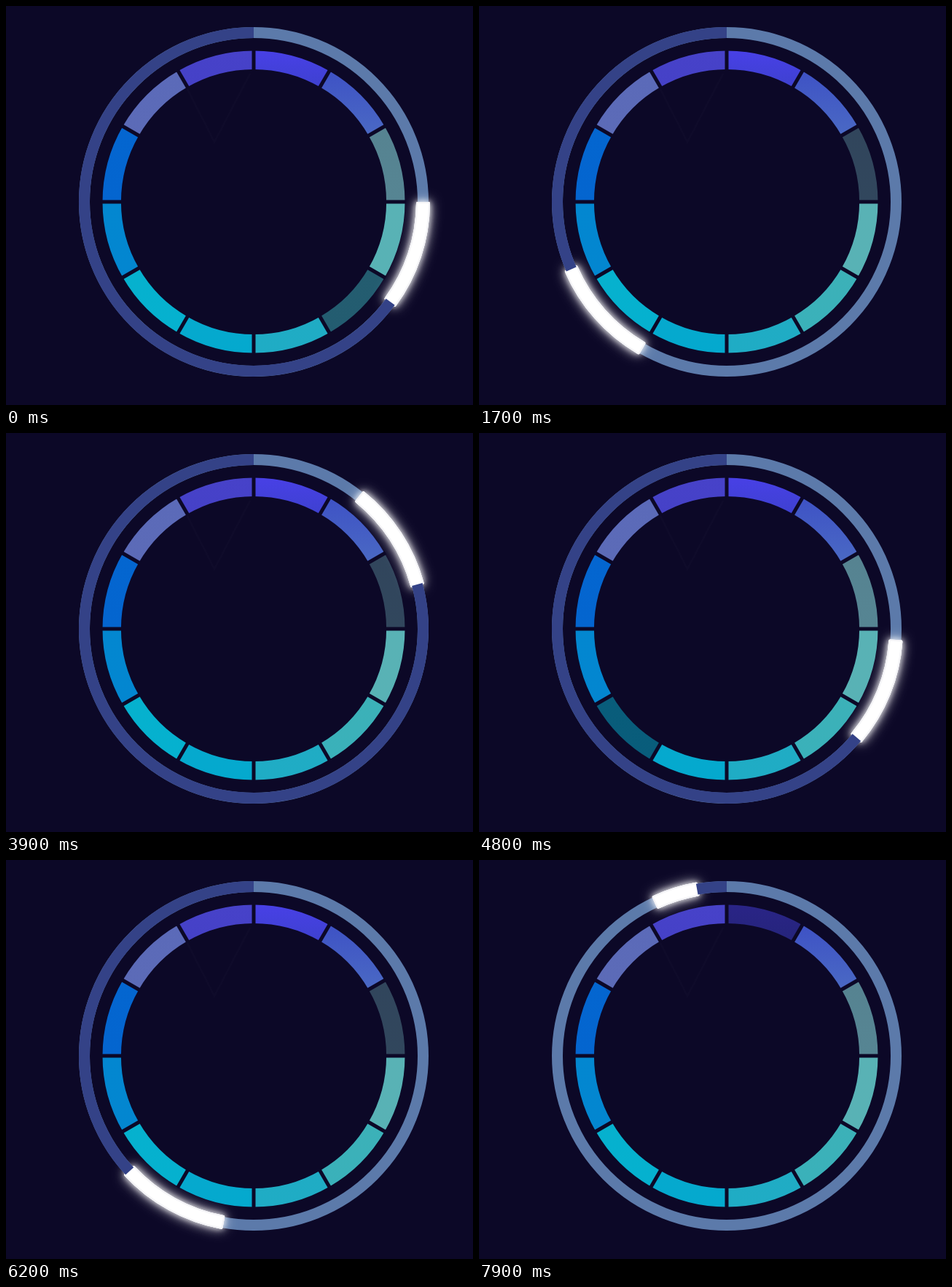
Recreate the animation shown at these times as an HTML page with a canvas. Size 641 px wide and 548 px high, loop 8 s.

```html
<!DOCTYPE html>
<html lang="en">
<head>
<meta charset="utf-8">
<title>Ring loader</title>
<style>
  html, body { margin: 0; width: 100%; height: 100%; overflow: hidden; background: #0c0827; }
  canvas { display: block; }
</style>
</head>
<body>
<canvas id="stage" width="641" height="548"></canvas>
<script>
const ctx = document.getElementById('stage').getContext('2d');
const BG = '#0c0827', CX = 340, CY = 269;
const LOOP = 8000, TICK = 100;
const TRACK = { r: 232.5, width: 15, dark: '#344287', light: '#5c7aaa' };
const DIAL = { r: 194.8, width: 25.4 };

// One lap of the bar: time in ms, tail angle, head angle (clockwise from the top)
const LAP = 4770, LAP_START = 3290;
const STEPS = [
  [0, 0, 0],
  [160, 10.2, 25],
  [450, 28.7, 63],
  [610, 38.9, 74.8],
  [1480, 90.5, 126.2],
  [1510, 94.2, 129.9],
  [2280, 148.5, 185.2],
  [2910, 190.7, 227.1],
  [4080, 275.7, 311.3],
  [4300, 291.5, 327.3],
  [4610, 335.3, 349.9],
  [4770, 360, 360]
];

// Segment colours, top and bottom, clockwise from the top
const COLORS = [
  ['#4840e6', '#3e41d0'], ['#3e52c5', '#4a69c4'], ['#568391', '#568593'],
  ['#59b2b5', '#58b2b5'], ['#3cb1b8', '#3ab1ba'], ['#20acc4', '#1facc5'],
  ['#06a9ce', '#04a9ce'], ['#06b1ce', '#05b1cf'], ['#0387d0', '#0386d0'],
  ['#0466d0', '#0465cf'], ['#5b6ab9', '#5c6bb7'], ['#4742c9', '#4541c7']
];
const BLINK = 182, BLINK_OFFSET = 4.8;

const rad = deg => (deg - 90) * Math.PI / 180;

function barAt(t) {
  const u = (t - LAP_START + LAP) % LAP;
  const i = STEPS.findIndex(s => s[0] > u);
  const a = STEPS[i - 1], b = STEPS[i];
  const k = (u - a[0]) / (b[0] - a[0]);
  return [1, 2].map(n => a[n] + (b[n] - a[n]) * k);
}

function arc(r, width, from, to, color) {
  ctx.beginPath();
  ctx.arc(CX, CY, r, rad(from), rad(to));
  ctx.lineWidth = width;
  ctx.strokeStyle = color;
  ctx.stroke();
}

function drawTrack(tail, head) {
  const { r, width, dark, light } = TRACK;
  arc(r, width, 0, 360, light);
  if (head - tail > 0.5) drawBar(tail, head);
  if (head < 360) arc(r, width, head, 360, dark);
}

function drawBar(tail, head) {
  const { r, width } = TRACK;
  const bar = new Path2D();
  bar.arc(CX, CY, r + width / 2, rad(tail), rad(head));
  bar.arc(CX, CY, r - width / 2, rad(head), rad(tail), true);
  bar.closePath();
  ctx.save();
  ctx.lineJoin = 'round';
  ctx.lineWidth = 4;
  ctx.strokeStyle = '#f4f4f7';
  for (const blur of [17, 8]) {
    ctx.shadowColor = 'rgba(255,255,255,0.75)';
    ctx.shadowBlur = blur;
    ctx.stroke(bar);
    ctx.fillStyle = '#fff';
    ctx.fill(bar);
  }
  ctx.shadowColor = 'transparent';
  ctx.stroke(bar);
  ctx.fill(bar);
  ctx.restore();
}

function segmentFill(i) {
  const { r, width } = DIAL;
  const ys = [];
  for (const a of [i * 30, i * 30 + 30])
    for (const d of [-width / 2, width / 2]) ys.push(CY + (r + d) * Math.sin(rad(a)));
  const g = ctx.createLinearGradient(0, Math.min(...ys), 0, Math.max(...ys));
  COLORS[i].forEach((c, n) => g.addColorStop(n, c));
  return g;
}

function drawDial(dim) {
  const { r, width } = DIAL;
  for (let i = 0; i < 12; i++) {
    ctx.globalAlpha = i === dim ? 0.5 : 1;
    arc(r, width, i * 30, i * 30 + 30, segmentFill(i));
  }
  ctx.globalAlpha = 1;
  ctx.beginPath();
  for (let i = 0; i < 12; i++) {
    const c = Math.cos(rad(i * 30)), s = Math.sin(rad(i * 30));
    ctx.moveTo(CX + c * 180, CY + s * 180);
    ctx.lineTo(CX + c * 209, CY + s * 209);
  }
  ctx.lineWidth = 5;
  ctx.strokeStyle = BG;
  ctx.stroke();
}

function drawCrease() {
  ctx.beginPath();
  ctx.moveTo(248, 112);
  ctx.lineTo(286, 187);
  ctx.lineTo(335, 93);
  ctx.lineWidth = 3;
  ctx.strokeStyle = 'rgba(255,255,255,0.012)';
  ctx.stroke();
}

function draw(t) {
  ctx.fillStyle = BG;
  ctx.fillRect(0, 0, 641, 548);
  drawCrease();
  drawTrack(...barAt(t));
  drawDial(Math.floor(BLINK_OFFSET + t / BLINK) % 12);
}

const start = performance.now();
function frame() {
  const t = (performance.now() - start) % LOOP;
  draw(Math.floor(t / TICK) * TICK);
  requestAnimationFrame(frame);
}
frame();
</script>
</body>
</html>
```
